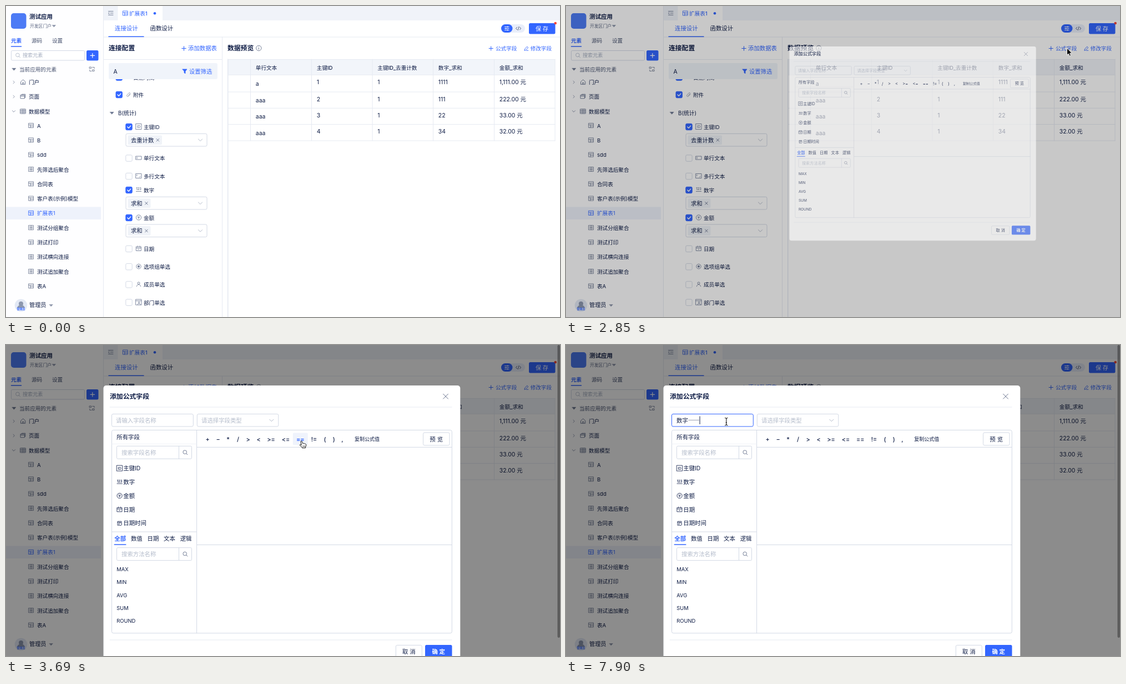
These frames come from a looping animation (998x561 px, 8 s). An HTML page:

```html
<!DOCTYPE html>
<html lang="zh-CN">
<head>
<meta charset="utf-8">
<title>公式字段</title>
<style>
html, body { margin: 0; width: 100%; height: 100%; overflow: hidden; background: #fff; }
svg { display: block; width: 998px; height: 561px; }
text { font-family: Inter, "Noto Sans CJK SC", "Noto Sans CJK", sans-serif; white-space: pre; }
.cjk { font-family: "Noto Sans CJK SC", "Noto Sans CJK", sans-serif; }
</style>
</head>
<body>
<svg id="stage" viewBox="0 0 998 561" xmlns="http://www.w3.org/2000/svg"></svg>
<script>
const INK = '#0f1d46', BLUE = '#3366ff', GREY = '#8a93a8', HINT = '#b4bccb', LINE = '#e6eaf2', EDGE = '#d3d9e5', SOFT = '#f0f4fa';
const $ = id => document.getElementById(id);

// Drawing helpers: text is placed by its vertical centre
const T = (x, cy, s, o = {}) => {
  const z = o.z || 9.6;
  return `<text x="${x}" y="${(cy + z * 0.37).toFixed(2)}" font-size="${z}" fill="${o.c || INK}" font-weight="${o.w || 400}"` +
    ` text-anchor="${o.a || 'start'}" ${o.id ? `id="${o.id}"` : ''} ${o.k ? `class="${o.k}"` : ''}>${s.replace(/</g, '&lt;').replace(/>/g, '&gt;')}</text>`;
};
const R = (x, y, x2, y2, fill, r = 0, stroke = 'none', extra = '') =>
  `<rect x="${x}" y="${y}" width="${x2 - x}" height="${y2 - y}" rx="${r}" fill="${fill}" stroke="${stroke}" ${extra}/>`;
const P = (d, c = GREY, w = 0.9, fill = 'none') =>
  `<path d="${d}" stroke="${c}" stroke-width="${w}" fill="${fill}" stroke-linecap="round" stroke-linejoin="round"/>`;
const C = (x, y, r, fill, stroke = 'none') => `<circle cx="${x}" cy="${y}" r="${r}" fill="${fill}" stroke="${stroke}" stroke-width=".9"/>`;
const H = (x, x2, y, c = LINE, w = 1) => P(`M${x} ${y}H${x2}`, c, w);
const V = (x, y, y2, c = LINE, w = 1) => P(`M${x} ${y}V${y2}`, c, w);
const plus = (x, y, r, c, w = 1.1) => P(`M${x - r} ${y}h${2 * r}M${x} ${y - r}v${2 * r}`, c, w);
const cross = (x, y, r, c = GREY, w = 0.9) => P(`M${x - r} ${y - r}l${2 * r} ${2 * r}M${x + r} ${y - r}l${-2 * r} ${2 * r}`, c, w);
const down = (x, y, r = 3.5, c = HINT) => P(`M${x - r} ${y - r / 2}l${r} ${r}l${r} ${-r}`, c, 1);
const drop = (x, y, r = 3, c = GREY) => P(`M${x - r} ${y - r / 2}h${2 * r}l${-r} ${r * 1.1}z`, c, 0.6, c);
const lens = (x, y, c = GREY) => C(x - 0.6, y - 0.6, 3.3, 'none', c) + P(`M${x + 2} ${y + 2}l2 2`, c, 1);

// Small pictograms centred on x, y
const icon = {
  table: (x, y, c) => P(`M${x - 4} ${y - 4}h8.4v8h-8.4zM${x - 4} ${y - 1.3}h8.4M${x - 1.2} ${y - 1.3}v5.3M${x - 1.2} ${y + 1.4}h5.6`, c, 0.8),
  merge: (x, y, c) => P(`M${x - 4} ${y - 4}h8.4v8h-8.4zM${x + 0.2} ${y - 4}v8M${x - 2.4} ${y - 1.8}h1M${x + 1.8} ${y - 1.8}h1M${x - 2.4} ${y}h5.2M${x - 2.4} ${y + 1.8}h1M${x + 1.8} ${y + 1.8}h1`, c, 0.8),
  id: (x, y, c) => P(`M${x - 5} ${y - 5}h10v10h-10z`, c, 0.9) + T(x, y, 'ID', { z: 6.6, c, a: 'middle', w: 500 }),
  line: (x, y, c) => P(`M${x - 5} ${y - 3}h10v6h-10zM${x - 3} ${y - 1.4}v2.8`, c, 0.9),
  area: (x, y, c) => P(`M${x - 5} ${y - 4}h10v8h-10zM${x - 3.2} ${y - 2}v2M${x + 1.4} ${y + 2.4}l2-2`, c, 0.9),
  num: (x, y, c) => T(x, y - 1.2, '123', { z: 5.6, c, a: 'middle', w: 700 }) + H(x - 4.6, x + 4.6, y + 3, c, 0.9),
  coin: (x, y, c) => C(x, y, 4.6, 'none', c) + P(`M${x - 1.8} ${y - 2.4}l1.8 2l1.8-2M${x} ${y - 0.4}v3M${x - 1.8} ${y + 0.2}h3.6`, c, 0.8),
  date: (x, y, c) => P(`M${x - 4.3} ${y - 3.4}h8.6v7.4h-8.6zM${x - 4.3} ${y - 1}h8.6M${x - 2} ${y - 4.6}v1.6M${x + 2} ${y - 4.6}v1.6M${x - 1} ${y + 1.4}h2`, c, 0.9),
  time: (x, y, c) => P(`M${x - 1.4} ${y + 3.6}h-2.2v-7h7v2.4M${x - 3.6} ${y - 1.6}h5`, c, 0.9) + C(x + 1.3, y + 1.4, 2.6, 'none', c),
  radio: (x, y, c) => C(x, y, 4.2, 'none', c) + C(x, y, 2.1, c),
  user: (x, y, c) => C(x, y - 2, 2, 'none', c) + P(`M${x - 3.6} ${y + 3.8}c.4-4.6 6.8-4.6 7.2 0`, c, 0.9),
  dept: (x, y, c) => P(`M${x - 5} ${y - 5}h10v10h-10zM${x - 5} ${y - 2.4}h10`, c, 0.9) + C(x + 0.6, y + 0.6, 1.3, 'none', c) + P(`M${x - 2} ${y + 4.4}c.4-2.8 4.8-2.8 5.2 0`, c, 0.9),
  clip: (x, y, c) => P(`M${x + 3} ${y - 0.6}l-3 3.2c-2 2-4.4-.4-2.6-2.4l3.2-3.2c1.4-1.4 3 .2 1.8 1.6l-2.8 2.9`, c, 0.9),
};

function sidebar() {
  let s = R(0, 0, 175.5, 561, '#fefeff') + V(175.5, 0, 561);
  s += R(9, 13, 36.5, 41, '#4d7bf5', 5);
  s += T(42, 19, '测试应用', { z: 10.5, w: 600 }) + T(43, 36, '开发区门户', { z: 7.8, c: '#5c6782' }) + drop(86.5, 36);
  s += T(9, 62.5, '元素', { c: BLUE, w: 600 }) + T(46, 62.5, '源码', { c: '#46516e' }) + T(83, 62.5, '设置', { c: '#46516e' });
  s += H(9.5, 27.5, 73, BLUE, 1.6);
  s += R(9.5, 80.5, 141.5, 98, '#fff', 2, EDGE) + lens(21.5, 89, HINT) + T(30, 89, '搜索元素', { z: 9.1, c: '#a4adbf' });
  s += R(145, 80, 166.5, 98.5, BLUE, 2.5) + plus(155.8, 89.3, 3.8, '#fff', 1.2);
  s += drop(14.5, 114, 3.3, '#667089') + T(24, 114, '当前应用的元素', { c: '#46516e' });
  s += P('M150.5 110h3v2.6h-3zM156 115h3v2.6h-3zM155.5 110.5h3.6v2.4M154 117.5h-3.2v-2.4', '#667089', 0.8);
  const tops = ['门户', '页面', '数据模型'];
  tops.forEach((n, i) => {
    const y = [137.5, 163.5, 190][i];
    s += i < 2 ? P(`M13 ${y - 2.3}l2.4 2.3l-2.4 2.3`, GREY, 0.9) : down(14, y, 2.6, GREY);
    s += T(41, y, n, { w: 500 });
  });
  s += P('M26.8 136.5l4-3.6l4 3.6v4.8h-8zM29.6 141v-2.8h2.4v2.8', '#66718c', 0.9);
  s += P('M28.4 160.4v-1.2h6.4v6h-1.4M26.4 160.6h7v6.2h-7zM26.4 162.6h7', '#66718c', 0.9);
  s += P('M26 186h9.4v8h-9.4zM26 188.6h9.4M29.2 186v8M32.3 186v8M26 191.3h9.4', '#66718c', 0.9);
  const kids = ['A', 'B', 'sdd', '先筛选后聚合', '合同表', '客户表(示例)模型', '扩展表1', '测试分组聚合', '测试打印', '测试横向连接', '测试追加聚合', '表A'];
  kids.forEach((n, i) => {
    const y = 216 + 26.32 * i, on = i === 6, c = on ? BLUE : '#66718c';
    if (on) s += R(0, 362.5, 171, 385, '#eef2fb');
    s += icon[[3, 7, 9, 10].includes(i) ? 'merge' : 'table'](45, y - 0.5, c);
    s += T(56, y, n, { c: on ? BLUE : INK });
  });
  s += C(27, 540, 11.3, '#e3e9f5') + C(27, 537, 4, '#8c97ae') + P('M20.5 544c1-6 12-6 13 0z', '#8c97ae', 0.5, '#8c97ae');
  s += T(27, 546, '管理员', { z: 5, c: BLUE, a: 'middle', w: 700 });
  return s + T(42, 539, '管理员', { z: 10.2 }) + drop(81.3, 540, 3);
}

function topBars() {
  let s = R(176, 0, 998, 26, '#f0f3f9') + R(201.5, 0, 282, 26, '#fff');
  s += P('M184.5 9.5h8.5M188 12.8h5M184.5 16.2h8.5M186 11.6l-1.6 1.3l1.6 1.3', '#66718c', 0.9);
  s += icon.table(214.8, 13, BLUE) + T(222, 13, '扩展表1', { c: BLUE, w: 500 }) + C(268, 13.2, 2.3, BLUE);
  s += T(196, 40.5, '连接设计', { z: 10.4, c: BLUE }) + T(259.5, 40.5, '函数设计', { z: 10.4 });
  s += H(176, 998, 56) + H(185, 248, 55.3, BLUE, 1.5);
  s += R(892, 33, 935, 48, '#e9eefa', 7.5) + R(892, 33, 912.5, 48, BLUE, 7.5);
  s += P('M898.5 37.6h7.5M898.5 40.5h7.5M898.5 43.4h7.5M903.6 36.8v1.6M900.5 39.7v1.6M903.6 42.6v1.6', '#fff', 0.9);
  s += P('M920.8 38.2l-2.4 2.3l2.4 2.3M925.4 38.2l2.4 2.3l-2.4 2.3M923.9 37.4l-1.6 6.2', '#46516e', 0.9);
  return s + R(942, 31, 989.5, 50.5, BLUE, 2.5) + T(965.5, 41, '保 存', { z: 10.2, c: '#fff', a: 'middle', w: 500 }) + C(989.7, 31, 2.3, '#f5483b');
}

function box(x, y, on) {
  return R(x, y - 5.7, x + 11.4, y + 5.7, on ? BLUE : '#fff', 2, on ? BLUE : EDGE) +
    (on ? P(`M${x + 3} ${y}l2.2 2.3l3.6-4.2`, '#fff', 1.4) : '');
}

function picker(y, label, x2) {
  return R(216, y, 362, y + 22.7, '#fff', 2.5, EDGE) + R(219.5, y + 3, x2, y + 20, '#f0f3f8', 2) +
    T(225, y + 11.5, label, { z: 10.3 }) + cross(x2 - 7.6, y + 11.5, 2.3, '#66718c') + down(350, y + 11.5, 3.6);
}

function config() {
  let s = H(176, 389, 96.5) + V(389.5, 56, 561);
  s += T(185, 76, '连接配置', { z: 11.8, w: 600 }) + plus(320.5, 76.5, 3.8, BLUE) + T(328, 76.5, '添加数据表', { z: 10.4, c: BLUE });
  s += box(198, 128.5, 1) + T(229, 129, '日期时间') + R(185, 103, 381, 132, SOFT, 3);
  s += T(193.5, 118, 'A', { z: 10.4 }) + P('M318 114h8l-3 3.8v4l-2-1.4v-2.6z', BLUE, 0.8, BLUE) + T(330, 118, '设置筛选', { z: 10.3, c: BLUE });
  s += box(198, 160, 1) + icon.clip(220.8, 160, GREY) + T(229, 160.5, '附件');
  s += drop(190.8, 193, 3.3, '#66718c') + T(202, 193, 'B(统计)', { z: 9.8 });
  const rows = [['主键ID', 218, 'id', 1], ['单行文本', 274.5, 'line'], ['多行文本', 307, 'area'], ['数字', 332, 'num', 1], ['金额', 382, 'coin', 1],
    ['日期', 438, 'date'], ['选项组单选', 470.3, 'radio'], ['成员单选', 502.5, 'user'], ['部门单选', 534.7, 'dept']];
  rows.forEach(([n, y, k, on]) => s += box(215.8, y, on) + icon[k](239, y - 0.5, '#75809a') + T(248, y + 0.3, n));
  return s + picker(230.3, '去重计数', 281) + picker(344.3, '求和', 260.5) + picker(394, '求和', 260.5);
}

function preview() {
  let s = T(399, 76, '数据预览', { z: 11.8, w: 600 }) + C(455.3, 76, 4.7, 'none', '#66718c') + P('M455.3 75.6v2.6M455.3 73.6v.1', '#66718c', 1);
  s += plus(873.7, 76.5, 3.6, BLUE, 1) + T(882, 76.5, '公式字段', { c: BLUE });
  s += P('M934 80l.5-2.4l4.2-4.4l2 1.8l-4.3 4.4zM937.4 80.2h3.4', BLUE, 0.9) + T(944.7, 76.5, '修改字段', { c: BLUE });
  s += R(400, 96, 989, 124, '#f2f5fa', 2) + V(399.7, 96, 561, '#e2e7f0', 1.4);
  [96.5, 124.3, 155, 184.3, 213.6, 243].forEach(y => s += H(400, 989, y));
  const cols = [440.5, 550.5, 660, 769.5, 879.5];
  [...cols, 989].forEach(x => s += V(x, 96, 243));
  const heads = ['单行文本', '主键ID', '主键ID_去重计数', '数字_求和', '金额_求和'];
  const data = [['a', '1', '1', '1111', '1,111.00 元'], ['aaa', '2', '1', '111', '222.00 元'], ['aaa', '3', '1', '22', '33.00 元'], ['aaa', '4', '1', '34', '32.00 元']];
  heads.forEach((h, i) => s += T(cols[i] + 9.3, 111.3, h, { w: 500 }));
  data.forEach((row, j) => row.forEach((v, i) => s += T(cols[i] + 9.3, [137.5, 168, 197.3, 226.5][j] + (i ? 0 : 2.2), v, { z: 10.4 })));
  return s;
}

const OPS = [['+', 363], ['−', 382], ['*', 400], ['/', 418], ['>', 436], ['<', 455], ['>=', 477.5], ['<=', 504], ['==', 530.3], ['!=', 555], ['(', 574.5], [')', 590.7], [',', 606]];

function dialog() {
  const find = (y, hint) => R(199.5, y, 334.5, y + 23, '#fff', 2, EDGE) + V(311.5, y, y + 23, EDGE) + T(208, y + 11.6, hint, { z: 10.4, c: HINT }) + lens(322.8, y + 11.5, '#66718c');
  let s = R(175.5, 73, 818.3, 580, '#fff', 5);
  s += T(187, 92.3, '添加公式字段', { z: 11.85, w: 600 }) + cross(792, 92.7, 4.4, '#66718c', 1) + H(187, 803, 112);
  s += R(190.5, 124.5, 337.3, 147, '#fff', 2.5, EDGE, 'id="field"') + T(198, 136, '请输入字段名称', { z: 10.4, c: HINT, id: 'hint' });
  s += T(199, 136, '', { z: 10.4, id: 'typed', k: 'cjk' }) + R(0, 142.4, 0, 142.4, INK, 0, 'none', 'id="under" height=".8"').replace('height="0" ', '');
  s += '<rect id="caret" y="128.5" width="1" height="14.5" fill="#0f1d46"/>';
  s += R(344.3, 124.5, 490.8, 147, '#fff', 2.5, EDGE) + T(352, 136, '请选择字段类型', { z: 10.4, c: HINT }) + down(478.3, 136, 3.6);
  s += R(190.5, 153.5, 803.3, 519.8, '#fff', 3, EDGE) + V(343.6, 153.5, 519.8, EDGE);
  s += H(344, 803, 184.4, EDGE) + H(344, 803, 360.4, EDGE) + H(191, 343, 337, EDGE) + H(191, 343, 178.5, '#f0f2f7');
  s += T(199.3, 166.2, '所有字段', { z: 10.4 }) + find(182.3, '搜索字段名称') + find(365.6, '搜索方法名称');
  [['主键ID', 'id'], ['数字', 'num'], ['金额', 'coin'], ['日期', 'date'], ['日期时间', 'time']].forEach(([n, k], i) => {
    const y = 222.2 + 24.85 * i;
    s += icon[k](204.6, y, '#25325a') + T(211.3, y, n, { z: 10.4 });
  });
  ['全部', '数值', '日期', '文本', '逻辑'].forEach((n, i) => s += T(195.3 + 29.6 * i, 349.4, n, { z: 10.4, c: i ? INK : BLUE, w: i ? 400 : 600 }));
  s += H(195.3, 215.8, 360, BLUE, 1.6);
  ['MAX', 'MIN', 'AVG', 'SUM', 'ROUND'].forEach((n, i) => s += T(199.3, 404.6 + 23.35 * i, n, { z: 9.4 }));
  s += R(0, 158.5, 27, 180.5, '#eff3fc', 2, 'none', 'id="glow"');
  OPS.forEach(([o, x], i) => s += T(x, 169.7, o, { z: 10.8, a: 'middle', w: 500, id: 'op' + i }));
  s += T(627.3, 169.4, '复制公式值', { z: 9, w: 500, id: 'copy' });
  s += R(751.5, 158, 799, 181, '#fff', 2.5, EDGE) + T(775.2, 169.7, '预 览', { z: 10.4, a: 'middle' });
  s += H(187, 803, 532) + R(702.3, 541.5, 749.3, 564, '#fff', 2.5, EDGE) + T(725.8, 552.8, '取 消', { z: 10.4, a: 'middle' });
  return s + R(755, 541, 803.5, 564.5, BLUE, 2.5) + T(779.3, 552.8, '确 定', { z: 10.4, c: '#fff', a: 'middle', w: 600 });
}

const CURSORS =
  '<g id="arrow"><path d="M0 0V12.6L2.9 10L4.8 14.3L7 13.3L5.1 9.2H9z" fill="#000" stroke="#fff" stroke-width=".9" stroke-linejoin="round"/></g>' +
  '<g id="hand"><path d="M-1.6 .6C-1.6-.6 .4-.7 .8 .6L1.9 4.2C2.6 3.4 4 3.6 4.3 4.5C5 3.9 6.2 4.2 6.5 5C7.3 4.7 8 5.3 8.1 6.2C8.3 8.4 7.9 9.4 7 10.6V12.2H.9V11L-3 7.6C-3.8 6.6-2.6 5.7-1.6 6.3L-.3 7.2z" fill="#fff" stroke="#111" stroke-width="1" stroke-linejoin="round"/><path d="M2.4 8v2.6M4.2 8v2.6M5.9 8v2.6" stroke="#111" stroke-width=".7"/></g>' +
  '<g id="beam"><path d="M-2.6-5.6Q0-5.6 0-3.8Q0-5.6 2.6-5.6M0-4V7M-2.6 8Q0 8 0 6.2Q0 8 2.6 8M-1.2 3h2.4" fill="none" stroke="#fff" stroke-width="2.2"/><path d="M-2.6-5.6Q0-5.6 0-3.8Q0-5.6 2.6-5.6M0-4V7M-2.6 8Q0 8 0 6.2Q0 8 2.6 8M-1.2 3h2.4" fill="none" stroke="#000" stroke-width="1"/></g>';

$('stage').innerHTML =
  '<defs><filter id="blur" x="-10%" y="-30%" width="120%" height="180%"><feDropShadow dx="0" dy="1.5" stdDeviation="2" flood-opacity=".25"/></filter></defs>' +
  R(0, 0, 998, 561, '#fff') + sidebar() + topBars() + config() + preview() +
  R(0, 0, 998, 561, '#000', 0, 'none', 'id="mask"') + R(993.5, 0, 998, 528, '#000', 2.2, 'none', 'id="thumb" fill-opacity=".35"') +
  `<g id="dialog">${dialog()}</g><g id="ime"></g>` + CURSORS;

const clamp = v => Math.max(0, Math.min(1, v));
const ease = v => v * v * (3 - 2 * v);
const bez = (a, b, c, d, u) => (1 - u) ** 3 * a + 3 * (1 - u) ** 2 * u * b + 3 * (1 - u) * u * u * c + u ** 3 * d;

// Decelerating curve, cubic-bezier(.08, .82, .17, 1)
function circOut(x) {
  let lo = 0, hi = 1;
  for (let i = 0; i < 22; i++) {
    const m = (lo + hi) / 2;
    if (bez(0, 0.08, 0.17, 1, m) < x) lo = m; else hi = m;
  }
  return bez(0, 0.82, 1, 1, lo);
}

const MOVES = [
  { from: 250, to: 850, p: [[669, 566], [690, 235], [800, 225], [727, 539]] },
  { from: 1100, to: 1900, p: [[727, 539], [760, 330], [1120, 70], [902.5, 76]] },
  { from: 3410, to: 3690, p: [[902.5, 75], [780, 100], [650, 140], [532.5, 173.5]] },
  { from: 3940, to: 4500, p: [[532.5, 173.5], [450, 166], [360, 142], [288.8, 137]] },
];

function pointer(t) {
  const m = MOVES.filter(k => t >= k.from).pop();
  if (!m) return [-50, -50];
  const u = ease(clamp((t - m.from) / (m.to - m.from)));
  return [0, 1].map(i => bez(...m.p.map(q => q[i]), u));
}

// Typed text over time; a candidate list means it is still being composed
const TYPING = [
  [5930, 's', '是 说 上 时 谁 事 啥 收', 416],
  [6010, 'sh', '是 说 上 时 谁 事 啥 收', 416],
  [6090, 'shu', '数 书 树 输 属 熟 术 叔', 416],
  [6380, 'shu z', '数字 数组 数值 树枝 梳子 数 书', 462],
  [6830, 'shu zi', '数字 数字化 梳子 竖子 数 书', 462],
  [7400, '数字'],
  [7900, '数字——'],
];

function candidates(list, right) {
  let x = 203, s = R(199.5, 150.5, right, 182, '#f6f6f7', 4, '#d5d5d8', 'filter="url(#blur)"');
  list.split(' ').forEach((w, i) => {
    const wide = 12 + w.length * 12;
    if (!i) s += R(201.5, 153, x + wide, 179.5, '#dfe7fb', 3);
    s += T(x, 166.5, String(i + 1), { z: 7.5, c: '#777' }) + T(x + 7, 166, w, { z: 11.6, c: '#222', k: 'cjk' });
    x += wide + 3;
  });
  return s;
}

let shown = -2;
function typing(t) {
  let n = -1;
  TYPING.forEach((k, i) => { if (t >= k[0]) n = i; });
  if (n !== shown) {
    shown = n;
    const k = TYPING[n] || [0, ''];
    $('typed').textContent = k[1];
    $('hint').style.display = n < 0 ? '' : 'none';
    $('ime').innerHTML = k[2] ? candidates(k[2], k[3]) : '';
    const wide = k[1] ? $('typed').getComputedTextLength() : 0;
    $('under').setAttribute('x', 199);
    $('under').setAttribute('width', k[2] ? wide : 0);
    $('caret').setAttribute('x', 199 + wide);
  }
  const lit = (t >= 4580 && t < 5030) || t >= 5480;
  $('caret').style.display = lit ? '' : 'none';
}

function draw(t) {
  const open = t >= 2850;
  for (const id of ['mask', 'dialog', 'ime']) $(id).style.display = open ? '' : 'none';
  $('thumb').style.display = t >= 2970 ? '' : 'none';
  const [x, y] = pointer(t);

  if (open) {
    const age = t < 2970 ? 32 : 112 + Math.floor((t - 2970) / 40) * 40;
    const p = circOut(clamp(age / 300)), k = 0.2 + 0.8 * p;
    $('mask').setAttribute('opacity', 0.45 * p ** 1.5);
    $('dialog').setAttribute('opacity', p);
    $('dialog').setAttribute('transform', `translate(910 73) scale(${k}) translate(-910 -73)`);
  }

  const over = open && y > 159 && y < 181 ? OPS.findIndex(o => Math.abs(o[1] - x) < 11) : -1;
  OPS.forEach((o, i) => {
    const el = $('op' + i);
    el.setAttribute('fill', i === over ? BLUE : INK);
    el.setAttribute('font-weight', i === over ? 700 : 500);
  });
  $('glow').style.display = over < 0 ? 'none' : '';
  if (over >= 0) $('glow').setAttribute('x', OPS[over][1] - 13.5);
  $('copy').setAttribute('x', over < 0 ? 627.3 : 628);

  const f = clamp((t - 4540) / 80);
  const mix = (a, b) => Math.round(a + (b - a) * f);
  $('field').setAttribute('stroke', `rgb(${mix(211, 51)},${mix(217, 102)},${mix(229, 255)})`);
  typing(t);

  const link = !open && x > 868 && y < 84;
  const kind = link || over >= 0 ? 'hand' : open && x < 337 && y < 147 ? 'beam' : 'arrow';
  for (const id of ['arrow', 'hand', 'beam']) {
    $(id).style.display = id === kind ? '' : 'none';
    $(id).setAttribute('transform', `translate(${x.toFixed(2)} ${y.toFixed(2)})`);
  }
}

const start = performance.now();
function tick() {
  draw((performance.now() - start) % 8000);
  requestAnimationFrame(tick);
}
tick();
</script>
</body>
</html>
```
